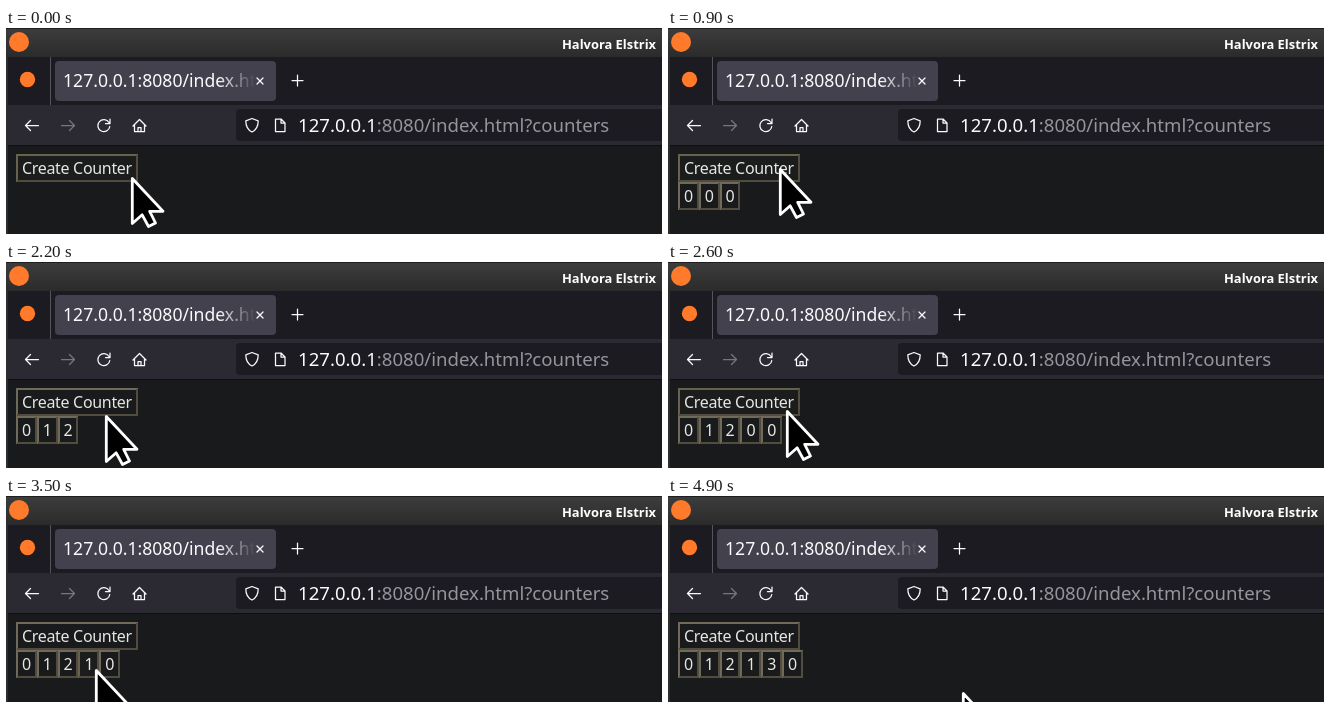
An HTML page that plays this animation: 656 px wide and 206 px high, repeating every 5.5 s.

```html
<!DOCTYPE html>
<html lang="en">
<head>
<meta charset="utf-8">
<title>Counters</title>
<style>
  html, body { margin: 0; width: 100%; height: 100%; overflow: hidden; background: #181a1b; }
  svg { display: block; width: 656px; height: 206px; font-family: "Noto Sans", sans-serif; }
  .icon { fill: none; stroke: #fbfbfe; stroke-width: 1.25; stroke-linecap: round; stroke-linejoin: round; }
  .dim { stroke: #77767f; }
  .button rect { fill: #181a1b; stroke: #706a5a; stroke-width: 2; }
  .button path { fill: none; stroke: #514c3f; stroke-width: 2; }
  .button.hover rect { fill: #1b1d1d; stroke: #676250; }
  .button text { fill: #e8e6e3; font-size: 16px; letter-spacing: -.32px; }
</style>
</head>
<body>
<svg viewBox="0 0 656 206">
  <defs>
    <linearGradient id="bar" x2="0" y2="1">
      <stop stop-color="#3d3d3d"/><stop offset="1" stop-color="#2b2b2b"/>
    </linearGradient>
    <linearGradient id="fade" gradientUnits="userSpaceOnUse" x1="212" x2="249">
      <stop stop-color="#fbfbfe"/><stop offset="1" stop-color="#fbfbfe" stop-opacity="0"/>
    </linearGradient>
  </defs>

  <rect width="656" height="206" fill="#181a1b"/>
  <rect width="656" height="29" fill="url(#bar)"/>
  <rect width="656" height="1" fill="#1e1e1e"/>
  <rect y="29" width="656" height="48" fill="#1c1b22"/>
  <rect y="77" width="656" height="40" fill="#2b2a33"/>
  <rect y="117" width="656" height="1" fill="#0e0e10"/>
  <rect y="29" width="2" height="177" fill="#2d2d2d"/>
  <circle cx="13" cy="14" r="10" fill="#ff7a2a"/>
  <circle cx="21.5" cy="51.5" r="7.7" fill="#ff7a2a"/>
  <text x="556" y="20.500" font-size="12.9" font-weight="700" fill="#fff">Halvora Elstrix</text>

  <path d="M44.5 29V77" stroke="#55545e"/>
  <rect x="49" y="33" width="221" height="40" rx="4" fill="#42414d"/>
  <text x="57" y="59" font-size="17.6" fill="url(#fade)">127.0.0.1:8080/index.html</text>
  <path class="icon" d="M251 50l6 6m0-6l-6 6M286 52.500h11m-5.500-5.500v11"/>

  <g class="icon">
    <path d="M32.500 97.500H19.500m5-5l-5 5 5 5"/>
    <path class="dim" d="M55.500 97.500H68.500m-5-5l5 5-5 5"/>
    <path d="M103 94.500a6 6 0 1 0 .8 4M104 91v4.500h-4.500"/>
    <path d="M127 98l6.500-6.500 6.500 6.500M128.500 97v6.500h10v-6.500M132 103.500v-4h3v4"/>
  </g>
  <rect x="230" y="81" width="440" height="32" rx="4" fill="#1c1b22"/>
  <g class="icon">
    <path d="M246 90.500l6.200 2.300c0 5.200-1.700 9.200-6.200 11.200-4.500-2-6.200-6-6.200-11.200z"/>
    <path d="M269.500 91h5.500l4 4v8.500h-9.500zM275 91v4h4"/>
  </g>
  <text x="292" y="104" font-size="18.6" fill="#fbfbfe">127.0.0.1<tspan fill="#96959c">:8080/index.html?counters</tspan></text>

  <g id="buttons"></g>
  <path id="cursor" d="M.3 .5V45.500L10.200 36.800 16.500 48.500 23.500 45 17.700 33.300H31z"
        fill="#000" stroke="#fff" stroke-width="2.8" stroke-linejoin="round"/>
</svg>
<script>
  const LOOP = 5500, STEP = 100, CLICK_GAP = 200;

  // Each visit arrives at a button, clicks it at a steady pace, then moves on.
  const visit = (button, arrive, x, y, clicks) => ({ button, arrive, x, y, clicks });
  const visits = [
    visit('start', 0, 126, 150, 0),
    visit('create', 400, 112, 141, 3),
    visit(1, 1300, 50, 165, 1),
    visit(2, 1500, 63, 164, 2),
    visit('create', 2400, 119, 149, 2),
    visit(3, 3200, 83, 179, 1),
    visit(4, 3900, 103, 164, 3),
    visit('create', 4500, 119, 143, 1),
    visit('end', 4900, 295, 197, 0)
  ];
  for (const v of visits) {
    v.times = Array.from({ length: v.clicks }, (_, i) => v.arrive + i * CLICK_GAP);
    v.leave = v.clicks ? v.times[v.clicks - 1] + STEP : v.arrive;
  }
  const clicksOn = button => visits.filter(v => v.button === button).flatMap(v => v.times);

  const layer = document.getElementById('buttons');
  const cursor = document.getElementById('cursor');

  function make(tag, attrs, parent) {
    const el = document.createElementNS('http://www.w3.org/2000/svg', tag);
    for (const k in attrs) el.setAttribute(k, attrs[k]);
    return parent.appendChild(el);
  }

  function addButton(label, left, y, width) {
    const x = Math.round(left), w = Math.round(left + width) - x;
    const g = make('g', { class: 'button' }, layer);
    make('rect', { x: x + 1, y: y + 1, width: w - 2, height: 26 }, g);
    make('path', { d: `M${x + 1} ${y + 27}h${w - 2}v-26` }, g);
    const text = make('text', { x: left + 6, y: y + 19.7 }, g);
    text.textContent = label;
    const hover = (px, py) =>
      g.classList.toggle('hover', px >= x && px < x + w && py >= y && py < y + 28);
    return { g, text, hover };
  }

  const create = addButton('Create Counter', 10, 126, 122);
  const counters = clicksOn('create').map((born, i) =>
    ({ born, clicks: clicksOn(i), ...addButton('0', 10 + 20.8 * i, 154, 20.8) }));

  function tip(t) {
    const i = visits.findLastIndex(v => v.arrive <= t);
    const a = visits[i], b = visits[i + 1] || a;
    const k = t > a.leave && b !== a ? (t - a.leave) / (b.arrive - a.leave) : 0;
    return [a.x + (b.x - a.x) * k, a.y + (b.y - a.y) * k];
  }

  function draw(now) {
    const t = Math.floor(now % LOOP / STEP) * STEP;
    const [x, y] = tip(t).map(Math.round);
    cursor.setAttribute('transform', `translate(${x} ${y})`);
    create.hover(x, y);
    for (const c of counters) {
      c.g.style.display = t >= c.born ? '' : 'none';
      c.text.textContent = c.clicks.filter(at => at <= t).length;
      c.hover(x, y);
    }
  }

  const start = performance.now();
  function tick() {
    draw(performance.now() - start);
    requestAnimationFrame(tick);
  }
  tick();
</script>
</body>
</html>
```
